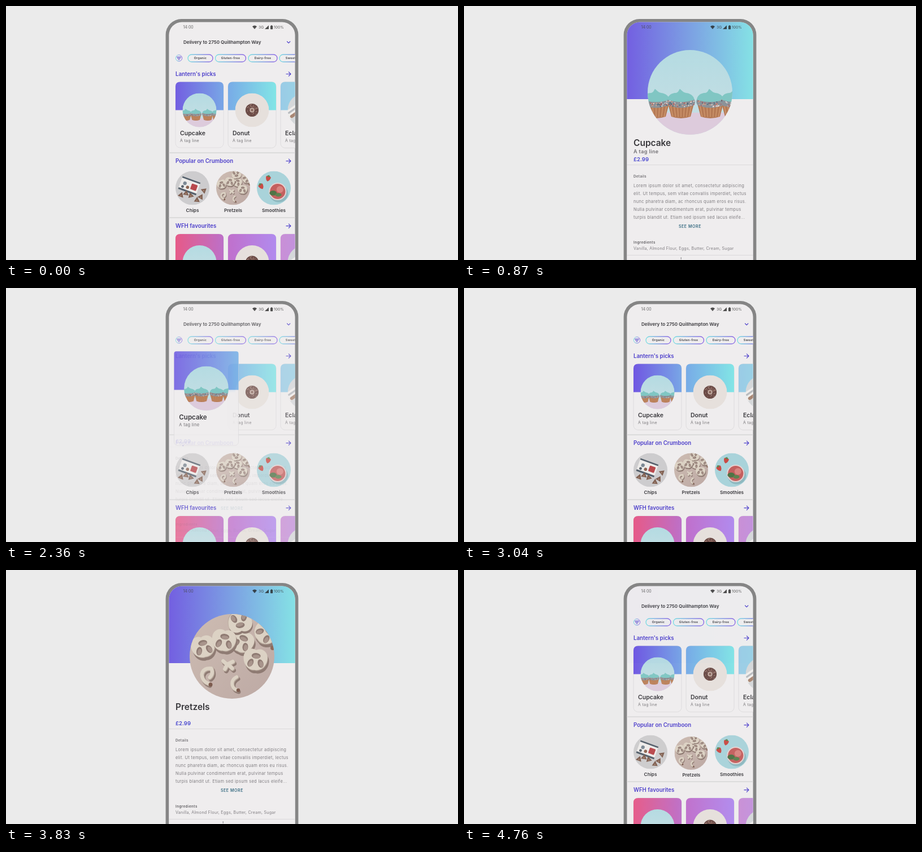
Recreate the animation shown at these times as an HTML page. Size 800 by 450 pixels, loop 4.78 s.

```html
<!DOCTYPE html>
<html lang="en">
<head>
<meta charset="utf-8">
<title>Snack shop</title>
<style>
html, body { margin: 0; width: 100%; height: 100%; overflow: hidden; background: #ebebeb; }
svg { display: block; width: 100vw; height: 100vh; font-family: Inter, "Open Sans", sans-serif; }
</style>
</head>
<body>
<svg id="stage" viewBox="0 0 800 450"></svg>
<script>
const LOOP = 4780;
const PURPLE = '#4d3fcb', INK = '#3a393d', PAPER = '#efedee';
const HEAD = ['#735fe1', '#85e2e5'];

const text = (x, y, size, str, o = {}) =>
  `<text x="${x}" y="${y}" font-size="${size}" font-weight="${o.w || 600}" fill="${o.c || INK}"` +
  ` letter-spacing="${o.ls || 0}" text-anchor="${o.a || 'start'}">${str}</text>`;
const circle = (x, y, r, c) => `<circle cx="${x}" cy="${y}" r="${r}" fill="${c}"/>`;
const oval = (x, y, rx, ry, c) => `<ellipse cx="${x}" cy="${y}" rx="${rx}" ry="${ry}" fill="${c}"/>`;
const box = (x, y, w, h, c, rx = 0) => `<rect x="${x}" y="${y}" width="${w}" height="${h}" rx="${rx}" fill="${c}"/>`;
const shape = (d, c) => `<path d="${d}" fill="${c}"/>`;
const line = (d, c, w) => `<path d="${d}" fill="none" stroke="${c}" stroke-width="${w}" stroke-linecap="round" stroke-linejoin="round"/>`;
const place = (x, y, turn, inner) => `<g transform="translate(${x} ${y}) rotate(${turn})">${inner}</g>`;
const fade = (id, a, b, dir = 'x2="1" y2="0"') =>
  `<linearGradient id="${id}" x1="0" y1="0" ${dir}><stop stop-color="${a}"/><stop offset="1" stop-color="${b}"/></linearGradient>`;
const photo = (id, inner) => `<g id="${id}" clip-path="url(#round)">${inner}</g>`;
const use = (id, x, y, r) => `<use href="#${id}" transform="translate(${x} ${y}) scale(${r / 75})"/>`;
const topPath = (x, y, w, h, r) =>
  `M${x} ${y + h}V${y + r}q0 ${-r} ${r} ${-r}h${w - 2 * r}q${r} 0 ${r} ${r}V${y + h}z`;

let seed = 7;
const rnd = () => (seed = seed * 16807 % 2147483647) / 2147483647;

// Photos, drawn in a circle of radius 75
function cupcake(x) {
  let s = shape('M-23 20L-17 43Q0 49 17 43L23 20z', '#b57a55');
  for (let i = -3; i <= 3; i++) s += line(`M${i * 6} 25L${i * 4.8} 43`, '#d19a70', 1.3);
  s += shape('M-24 20C-26 7 -18 1 -9 1C-4 0 -4 -4 -2 -6C2 -3 4 0 9 1C18 2 26 8 24 20Q0 30 -24 20z', '#80c6c3');
  s += shape('M-24 13Q0 21 24 13Q28 24 15 25Q0 30 -15 25Q-27 24 -24 13z', '#8c9298');
  const tints = ['#e9dcd8', '#b3605f', '#4f6878', '#d7a48b'];
  for (let i = 0; i < 40; i++) {
    const u = rnd() * 2 - 1;
    s += circle((u * 23).toFixed(1), (18 - 4 * u * u + rnd() * 8).toFixed(1), 1.1, tints[i % 4]);
  }
  return place(x, 0, 0, s);
}
const cakes = box(-75, -75, 150, 150, 'url(#sky)') + box(-75, 36, 150, 40, '#ddcbdc') +
  [-60, -16, 36, 79].map(cupcake).join('');

const CREAM = '#dcd2c4', SHADE = '#8f7b73', EDGE = '#b9aa9e';
const knot = 'M0 -18C10 -24 23 -16 21 -2C20 10 10 19 0 17C-10 19 -20 10 -21 -2C-23 -16 -10 -24 0 -18z';
const hole = (x, y, rx, ry, t) => place(x, y, t, oval(0, 0, rx, ry, SHADE) + oval(.8, 1.4, rx - 1.6, ry - 1.8, '#a8948b'));
function pretzel(x, y, turn) {
  return place(x + 2, y + 5, turn, shape(knot, SHADE)) +
    place(x, y, turn, shape(knot, EDGE) + place(-.8, -1.2, 0, shape(knot, CREAM)) +
      hole(0, -9, 8, 5, 0) + hole(-9, 4, 5, 7.5, 22) + hole(9, 4, 5, 7.5, -22));
}
// A broken piece: shadow, shaded edge, then the light top
const piece = (x, y, d, w) => place(x + 2, y + 3, 0, line(d, SHADE, w)) +
  place(x, y, 0, line(d, EDGE, w)) + place(-.6 + x, y - .8, 0, line(d, CREAM, w - 1.4));
const pretzels = box(-75, -75, 150, 150, 'url(#sand)') +
  pretzel(17, -24, 25) + pretzel(13, -64, 170) + pretzel(58, -40, 50) +
  pretzel(-50, -15, -12) + pretzel(-14, -26, 8) + pretzel(42, 8, 5) +
  piece(-6, 15, 'M-9 -6L-2 0L8 -5M-2 0L-6 8M0 0L7 7', 8) +
  piece(-44, 35, 'M8 -13Q-7 -14 -9 -2Q-8 10 3 14M8 -13Q12 -3 5 3', 7.5) + circle(-38, 50, 3.5, '#7d5b4e') +
  piece(6, 48, 'M3 -11Q-7 -6 -5 4Q-3 11 4 12', 7) + circle(11, 60, 3.2, '#7d5b4e') + circle(72, -15, 4, '#8d6a5b');

let ring = circle(0, 0, 29, '#6c4c47') + circle(0, 0, 10, '#cdb8ae') + circle(0, 0, 6, '#8b6a60');
for (let i = 0; i < 34; i++) {
  const a = rnd() * 6.28, d = 13 + rnd() * 13;
  ring += circle((Math.cos(a) * d).toFixed(1), (Math.sin(a) * d).toFixed(1), 1.5, i % 3 ? '#a77f74' : '#d9b9a9');
}
const donut = box(-75, -75, 150, 150, '#e6e0dc') + ring;

const chips = box(-75, -75, 150, 150, '#cdccce') +
  place(-14, -10, 20, box(-42, -30, 84, 60, '#eeecea', 3) + box(-42, -30, 84, 7, '#55606c') +
    box(-42, 22, 84, 8, '#55606c') + box(8, -14, 27, 26, '#b9494d', 3) +
    circle(-22, -4, 8, '#7d8994') + circle(-5, 9, 7, '#8d6552') + circle(-27, 13, 6, '#59636d')) +
  [[-28, 22, 10], [-8, 32, -15], [38, 38, 30], [20, 52, 5], [52, 10, 50], [-50, 30, 20]]
    .map(([x, y, t]) => place(x, y, t, shape('M-13 9L0 -13L13 9z', '#806052') + circle(0, 3, 3, '#a98977'))).join('');

const berry = (x, y, t) => place(x, y, t, shape('M-11 -7Q0 -15 11 -7Q11 7 0 14Q-11 7 -11 -7z', '#c94b45') +
  shape('M-8 -9L0 -15L8 -9L0 -5z', '#5f8452'));
const smoothie = box(-75, -75, 150, 150, '#a9d3da') + oval(22, 24, 41, 39, '#8fb9c0') +
  circle(17, 15, 39, '#e5d3d2') + circle(17, 15, 34, '#c4605f') + circle(27, 6, 15, '#d98580') +
  oval(-3, 22, 16, 11, '#4f7446') + oval(20, 30, 14, 8, '#5d8250') +
  berry(-25, -43, 15) + berry(-56, -8, -30);

const eclair = box(-75, -75, 150, 150, '#d5d8da') +
  place(-48, 8, -35, box(-30, -22, 70, 40, '#f0eeec', 6) + box(-26, 4, 60, 14, '#a98774', 7) + box(-24, -13, 52, 8, '#b9bcc0', 4));

// Home screen
const heading = (y, str) => text(300, y + 3.6, 9.7, str, { c: PURPLE }) +
  line(`M496 ${y}h8m-3.6 -3.6l3.6 3.6l-3.6 3.6`, PURPLE, 1.2);
const card = (x, y, grad, img, name) =>
  `<rect x="${x}" y="${y}" width="85" height="117" rx="8" fill="${PAPER}" stroke="#d9d7d9" stroke-width=".8"/>` +
  shape(topPath(x, y, 85, 50, 8), `url(#${grad})`) + use(img, x + 42.5, y + 50, 30) +
  text(x + 8, y + 94.5, 10.5, name) + text(x + 8, y + 106.5, 7, 'A tag line', { w: 400, c: '#7c7a7d', ls: .3 });
const chip = (x, w, str) =>
  `<rect x="${x}" y="86" width="${w}" height="13" rx="6.5" fill="${PAPER}" stroke="url(#edge)" stroke-width="1.3"/>` +
  text(x + w / 2, 94.4, 5.4, str, { a: 'middle', ls: .3 });
const snack = (x, img, name) => use(img, x, 322.5, 30) + text(x, 364.5, 8.2, name, { a: 'middle' });

const home =
  text(314, 67, 8.1, 'Delivery to 2750 Quillhampton Way') +
  line('M497.6 63l2.6 2.6l2.6 -2.6', PURPLE, 1.2) +
  `<circle cx="306" cy="92.3" r="5.6" fill="none" stroke="url(#edge)" stroke-width="1"/>` +
  line('M302.4 90.4h7.2M303.4 92.6h5.2M304.8 94.8h2.4', PURPLE, 1) +
  chip(322, 44, 'Organic') + chip(370.5, 54, 'Gluten-free') + chip(429, 51, 'Dairy-free') + chip(484, 39, 'Sweet') +
  heading(120.5, "Lantern's picks") +
  `<g id="homeCup">${card(300, 134.5, 'g0', 'cakes', 'Cupcake')}</g>` +
  card(393, 134.5, 'g1', 'donut', 'Donut') + card(486, 134.5, 'g2', 'eclair', 'Eclair') +
  box(288, 259.3, 224, 1.6, '#d8d7d8') + heading(274.7, 'Popular on Crumboon') +
  snack(330, 'chips', 'Chips') + `<g id="homePretzel">${snack(402, 'pretzels', 'Pretzels')}</g>` +
  snack(474, 'smoothie', 'Smoothies') +
  box(288, 374.2, 224, 1.6, '#d8d7d8') + heading(389.7, 'WFH favourites') +
  card(300, 404, 'g3', 'cakes', 'Cupcake') + card(393, 404, 'g4', 'donut', 'Donut') + card(486, 404, 'g5', 'eclair', 'Eclair');

// Detail screen
const lorem = ['Lorem ipsum dolor sit amet, consectetur adipiscing', 'elit. Ut tempus, sem vitae convallis imperdiet, lectus',
  'nunc pharetra diam, ac rhoncus quam eros eu risus.', 'Nulla pulvinar condimentum erat, pulvinar tempus',
  'turpis blandit ut. Etiam sed ipsum sed lacus eleife...'];
const soft = { w: 400, c: '#807e82', ls: .3 };
const body = text(300, 275.4, 9.5, '£2.99', { c: '#4a48cf' }) + box(288, 281, 224, .9, '#d9d7d9') +
  text(300, 303.7, 6.1, 'Details', { c: '#6b696d', ls: .4 }) +
  lorem.map((s, i) => text(300, 320.8 + 14 * i, 7.5, s, soft)).join('') +
  text(400, 393.2, 7, 'SEE MORE', { c: '#356a80', ls: .6, a: 'middle' }) +
  text(300, 420.5, 6.2, 'Ingredients', { c: '#5d5b5f', ls: .45 }) +
  text(300, 431.6, 7.2, 'Vanilla, Almond Flour, Eggs, Butter, Cream, Sugar', { ...soft, ls: .22 }) +
  box(288, 441, 224, .9, '#d9d7d9') + box(383.7, 445, .9, 4, '#77757a');

const status = `<g opacity=".78">` + text(313.5, 40.4, 7, '14:00', { w: 400, c: '#444' }) +
  shape('M436 36.2Q440 33 444 36.2L440 41z', '#222') + text(447, 40.4, 6.8, '3G', { w: 400, c: '#333' }) +
  shape('M458 41L465 34.3V41z', '#222') + box(468, 35, 4.2, 6.3, '#222', .8) + box(469.2, 34.2, 1.8, 1, '#222') +
  text(474, 40.4, 6.7, '100%', { w: 400, c: '#333' }) + '</g>';

document.getElementById('stage').innerHTML = `<defs>
  <clipPath id="round"><circle r="75"/></clipPath>
  <clipPath id="screen"><rect x="288.4" y="28.6" width="223.2" height="500" rx="23"/></clipPath>` +
  fade('sky', '#b4dbe2', '#c9dfe4', 'x2="0" y2="1"') + fade('sand', '#cdbcb2', '#bda9a4', 'x2="1" y2="1"') +
  fade('edge', '#76dfe2', '#8a62e4') +
  fade('g0', '#7057e2', '#78a6e6') + fade('g1', '#78abe7', '#82e5e6') + fade('g2', '#9acbe6', '#9ae0e6') +
  fade('g3', '#e65a88', '#bd70c8') + fade('g4', '#c070cc', '#b18bee') + fade('g5', '#c98fd6', '#b49aec') +
  `<linearGradient id="gHead"><stop stop-color="${HEAD[0]}"/><stop id="headEnd" offset="1" stop-color="${HEAD[1]}"/></linearGradient>` +
  photo('cakes', cakes) + photo('pretzels', pretzels) + photo('donut', donut) +
  photo('chips', chips) + photo('smoothie', smoothie) + photo('eclair', eclair) +
  `</defs>` + box(0, 0, 800, 450, '#ebebeb') +
  `<rect x="282.6" y="23" width="234.8" height="510" rx="28" fill="#858585"/>
  <g clip-path="url(#screen)">${box(288, 28, 224, 422, PAPER)}
    <g id="home">${home}</g>
    <g id="panel"><rect id="sheet" fill="${PAPER}" stroke="#dddbdd" stroke-width=".8"/><path id="head" fill="url(#gHead)"/></g>
    <g id="body">${body}</g>
    <use id="img"/>
    <text id="title" font-size="15.5" font-weight="600" fill="${INK}"></text>
    <text id="tag" font-size="9" font-weight="600" letter-spacing=".4" fill="#727074">A tag line</text>
    <g id="back"><circle id="disc" r="12"/><g id="arrow">${line('M3.6 0h-7m3.2 -3.2l-3.2 3.2l3.2 3.2', '#e9e6f2', 1.2)}</g></g>
    ${status}
  </g>`;

const el = {};
document.querySelectorAll('[id]').forEach(n => el[n.id] = n);
const set = (id, o) => { for (const k in o) el[id].setAttribute(k, o[k]); };
const mix = (a, b, p) => a + (b - a) * p;
const clamp = v => Math.max(0, Math.min(1, v));

// Remaining distance of an underdamped spring (ratio .8, stiffness 380)
function spring(ms) {
  if (ms <= 0) return 1;
  const t = ms / 1000;
  return Math.exp(-15.6 * t) * (Math.cos(11.7 * t) + 4 / 3 * Math.sin(11.7 * t));
}
function ease(ms) {
  const u = Math.max(0, ms) / 50;
  return Math.exp(-u) * (1 + u);
}

const visits = [
  { img: 'cakes', name: 'Cupcake', open: 200, close: 2237, x: 342.5, y: 184.5, tx: 308, ty: 229, size: 10.5, isCard: true },
  { img: 'pretzels', name: 'Pretzels', open: 3185, close: 4445, x: 402, y: 322.5, tx: 385.6, ty: 364.5, size: 8.2 }
];

function draw(t) {
  const v = visits[t < 2900 ? 0 : 1], shut = t - v.close;
  const p = shut < 0 ? 1 - spring(t - v.open) : spring(shut);
  const f = shut < 0 ? 1 - ease(t - v.open) : ease(shut - 20);

  set('home', { opacity: 1 - f ** 1.6 });
  set('homeCup', { visibility: v.isCard ? 'hidden' : 'visible' });
  set('homePretzel', { visibility: v.isCard ? 'visible' : 'hidden' });

  const q = v.isCard ? p : 1, m = clamp(q);
  const x = mix(300, 288, q), y = mix(134.5, 28, q), w = mix(85, 224, q);
  const h = mix(116.5, 422, Math.pow(m, 1.18)) + mix(0, 50, m * m);
  const r = Math.max(0, 8 - 20 * m);
  set('panel', { opacity: v.isCard ? 1 - .6 * m * (1 - m) : f });
  set('sheet', { x, y, width: w, height: h, rx: 8 * (1 - m) });
  set('head', { d: topPath(x, y, w, mix(50, 137, q), r) });
  const tint = [[120, 133], [166, 226], [230, 229]].map(([a, b]) => Math.round(mix(a, b, m)));
  set('headEnd', { 'stop-color': `rgb(${tint})` });

  set('body', { opacity: f ** 2.2 });
  set('img', { href: '#' + v.img, transform: `translate(${mix(v.x, 400, p)} ${mix(v.y, 153, p)}) scale(${mix(.4, 1, p)})` });
  el.title.textContent = v.name;
  set('title', { transform: `translate(${mix(v.tx, 300, p)} ${mix(v.ty, 248, p)}) scale(${mix(v.size / 15.5, 1, p)})` });
  set('tag', {
    visibility: v.isCard ? 'visible' : 'hidden',
    'font-weight': p > .5 ? 600 : 400,
    transform: `translate(${mix(308, 300, p)} ${mix(241, 261, p)}) scale(${mix(7 / 9, 1, p)})`
  });

  const out = clamp(shut / 50);
  const k = clamp((t - v.open - 720) / 300) * (1 - out);
  set('back', { transform: `translate(${305 + out * 8} ${64 + out * 7}) scale(${k})`, visibility: k > 0 ? 'visible' : 'hidden' });
  set('disc', { fill: out > 0 ? 'rgba(220,205,245,.22)' : 'rgba(42,36,80,.58)' });
  set('arrow', { opacity: out > 0 ? 0 : 1 });
}

const start = performance.now();
function tick() {
  draw((performance.now() - start) % LOOP);
  requestAnimationFrame(tick);
}
tick();
</script>
</body>
</html>
```
